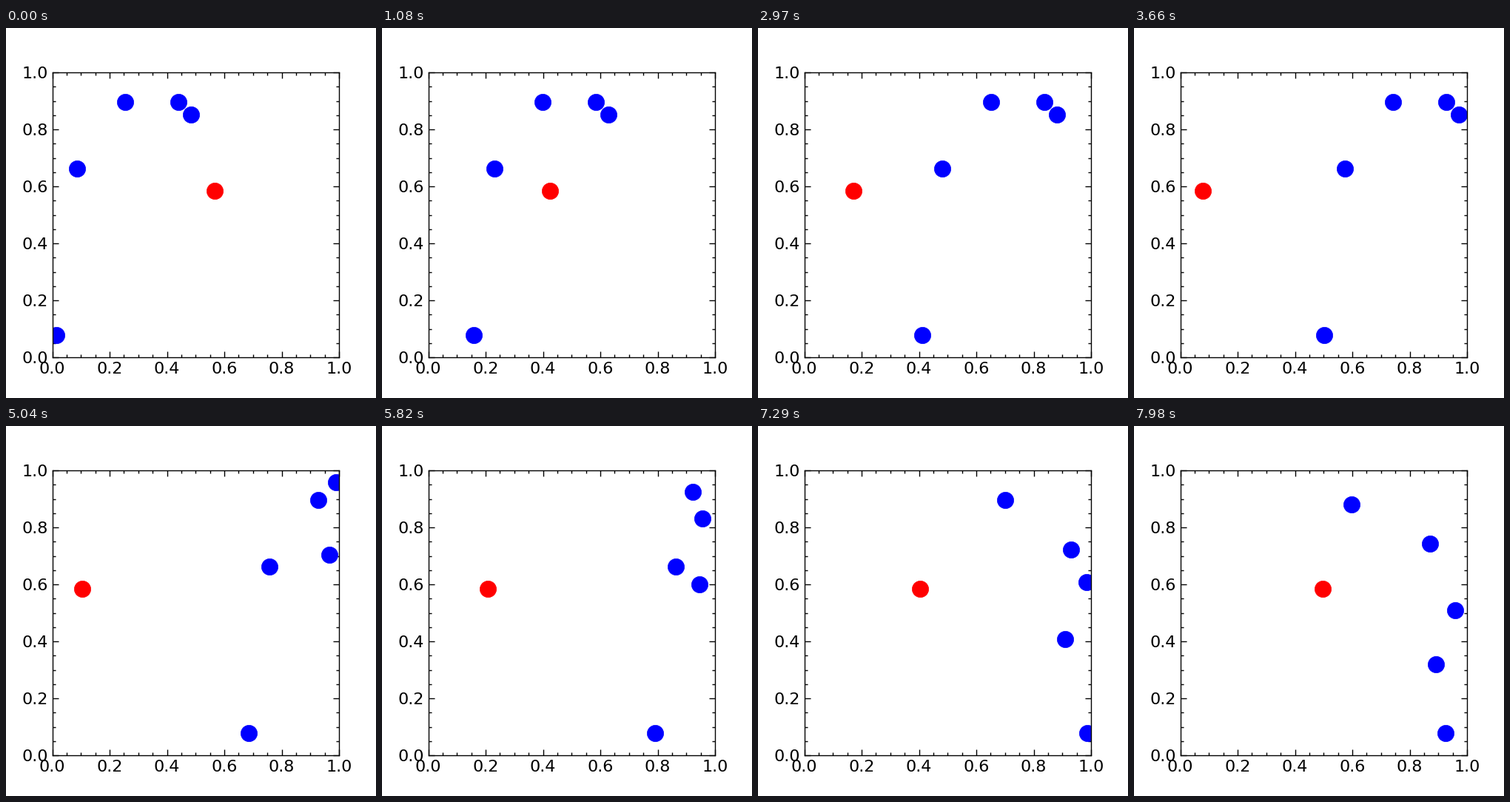
Animation, 500 px wide and 500 px high, one loop 8000 ms. Source, as a matplotlib script:

```python
import numpy as np
import matplotlib.pyplot as plt
from itertools import combinations
from matplotlib.animation import FuncAnimation
from matplotlib.ticker import MultipleLocator

FRAMES = 267
INTERVAL = 30
SPEED = 0.004
CONTACT = 0.06  # centre distance at which two balls bounce

# x, y, horizontal direction; the last ball is the red one
BALLS = np.array([
    (0.2552, 0.8969, 1),
    (0.4403, 0.8963, 1),
    (0.4846, 0.8521, 1),
    (0.0862, 0.6620, 1),
    (0.01445, 0.0780, 1),
    (0.5677, 0.5850, -1),
])


def collide(pos, vel):
    """Elastic bounce between equal masses that touch and approach."""
    for i, j in combinations(range(len(pos)), 2):
        gap = pos[j] - pos[i]
        dist = np.hypot(*gap)
        if dist >= CONTACT:
            continue
        normal = gap / dist
        closing = np.dot(vel[i] - vel[j], normal)
        if closing > 0:
            vel[i] -= closing * normal
            vel[j] += closing * normal


def simulate():
    pos = BALLS[:, :2].copy()
    vel = np.zeros_like(pos)
    vel[:, 0] = SPEED * BALLS[:, 2]
    track = [pos.copy()]
    for _ in range(FRAMES - 1):
        pos += vel
        collide(pos, vel)
        vel = np.where(pos > 1, -np.abs(vel), vel)
        vel = np.where(pos < 0, np.abs(vel), vel)
        track.append(pos.copy())
    return np.array(track)


track = simulate()

plt.rcParams["font.family"] = "DejaVu Sans"
fig = plt.figure(figsize=(5, 5), dpi=100, facecolor="white")
ax = fig.add_axes([0.125, 0.11, 0.775, 0.77])
ax.set(xlim=(0, 1), ylim=(0, 1))
for axis in (ax.xaxis, ax.yaxis):
    axis.set_major_locator(MultipleLocator(0.2))
    axis.set_minor_locator(MultipleLocator(0.05))
ax.tick_params(which="both", direction="in", top=True, right=True, width=1)
ax.tick_params(which="major", length=6, pad=4, labelsize=16)
ax.tick_params(which="minor", length=3)
for spine in ax.spines.values():
    spine.set_linewidth(1)

style = dict(ms=16, mew=0.5)
blue, = ax.plot([], [], "o", color="#0000ff", **style)
red, = ax.plot([], [], "o", color="#ff0000", **style)


def draw(i):
    pos = track[i]
    blue.set_data(pos[:-1, 0], pos[:-1, 1])
    red.set_data(pos[-1:, 0], pos[-1:, 1])
    return blue, red


anim = FuncAnimation(fig, draw, frames=FRAMES, interval=INTERVAL,
                     repeat=True, repeat_delay=0)
plt.show()
```
